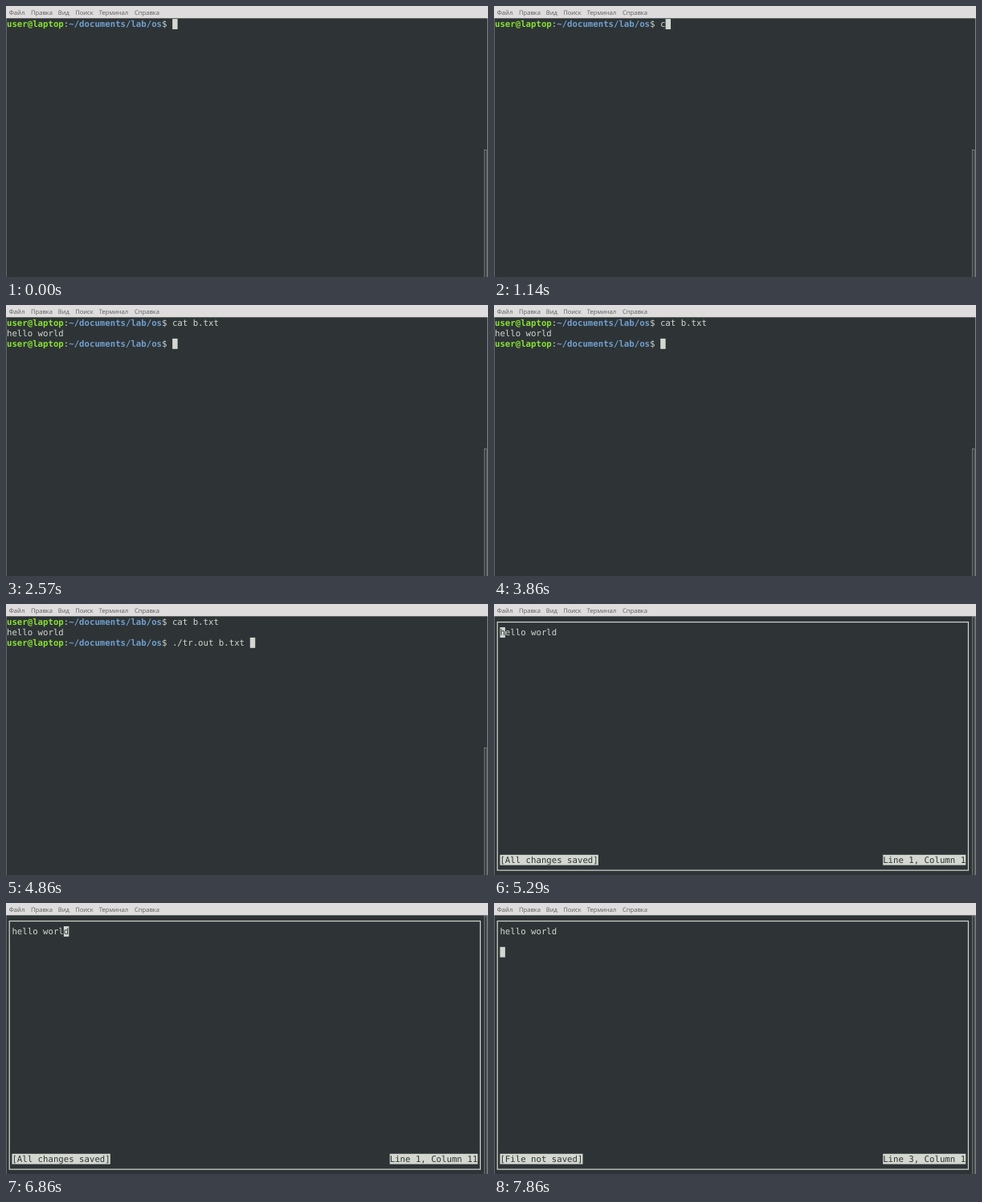
An HTML page that plays this animation: 600x338 px, repeating every 8000 ms.

```html
<!DOCTYPE html>
<html lang="ru">
<head>
<meta charset="utf-8">
<title>Terminal</title>
<style>
  html, body { margin: 0; width: 100%; height: 100%; overflow: hidden; background: #2e3436; }
  svg { display: block; width: 600px; height: 338px; }
  text { white-space: pre; text-rendering: geometricPrecision; }
  .mono { font: 10.7px "DejaVu Sans Mono", monospace; fill: #d3d7cf; }
  .menu { font: 7.6px "Open Sans", "Noto Sans", sans-serif; fill: #5c5c5c; }
  .user { font-weight: bold; fill: #8ae234; }
  .path { font-weight: bold; fill: #729fcf; }
  .light { fill: #d3d7cf; }
  .dark { fill: #2e3436; }
  .thumb { fill: #2b3032; stroke: #868a8a; stroke-width: .8; }
  .frame { fill: none; stroke: #d3d7cf; stroke-width: 1.2; }
</style>
</head>
<body>
<svg viewBox="0 0 600 338">
  <rect class="dark" width="600" height="338"/>
  <rect width=".6" height="338" fill="#85898a"/>
  <rect x="599.3" width=".7" height="338" fill="#a5a8a8"/>
  <rect width="600" height="15.3" fill="#dedcdd"/>
  <g id="menu"></g>
  <rect id="thumb" class="thumb" x="595.4" width="2.6" height="330"/>
  <g id="shell"></g>
  <g id="editor"></g>
  <g id="cursor"></g>
</svg>
<script>
const LOOP = 8000;
const CELL_W = 6.442, CELL_H = 12.9, LEFT = 1, TOP = 16.1, BASE = 9.9;
const COLS = 92, ROWS = 25, STATUS_ROW = 23;
const USER = "user@laptop", PATH = "~/documents/lab/os";
const PROMPT_LEN = USER.length + PATH.length + 3;
const LINE = "hello world";

const colX = col => LEFT + col * CELL_W;
const rowY = row => TOP + row * CELL_H;
const $ = id => document.getElementById(id);

function add(parent, tag, attrs = {}, content = "") {
  const node = document.createElementNS("http://www.w3.org/2000/svg", tag);
  for (const key in attrs) node.setAttribute(key, attrs[key]);
  node.textContent = content;
  return parent.appendChild(node);
}

function addText(parent, row, col, content = "", cls = "") {
  return add(parent, "text", { x: colX(col), y: rowY(row) + BASE, class: "mono " + cls }, content);
}

function addCell(parent, row, col) {
  return add(parent, "rect", {
    x: colX(col), y: rowY(row), width: CELL_W, height: CELL_H, class: "light"
  });
}

function addPrompt(row) {
  const line = addText($("shell"), row, 0);
  add(line, "tspan", { class: "user" }, USER);
  add(line, "tspan", {}, ":");
  add(line, "tspan", { class: "path" }, PATH);
  add(line, "tspan", {}, "$ ");
  return { line, input: add(line, "tspan") };
}

// Reversed status label, anchored to the left or right inner column
function addStatus(fromRight) {
  const back = addCell($("editor"), STATUS_ROW, 1);
  const label = addText($("editor"), STATUS_ROW, 1);
  label.style.fill = "#2e3436";
  return content => {
    const x = colX(fromRight ? COLS - 1 - content.length : 1);
    back.setAttribute("x", x);
    back.setAttribute("width", content.length * CELL_W);
    label.setAttribute("x", x);
    label.textContent = content;
  };
}

const menu = [["Файл", 3.8], ["Правка", 31], ["Вид", 64.8], ["Поиск", 86.2], ["Терминал", 115.8], ["Справка", 160]];
for (const [name, x] of menu) add($("menu"), "text", { x, y: 10.7, class: "menu" }, name);

const first = addPrompt(0);
const output = addText($("shell"), 1, 0, LINE);
const second = addPrompt(2);

add($("editor"), "rect", {
  x: colX(.5), y: rowY(.5), class: "frame",
  width: (COLS - 1) * CELL_W, height: (ROWS - 1) * CELL_H
});
addText($("editor"), 1, 1, LINE);
const setSaved = addStatus(false);
const setPosition = addStatus(true);

addCell($("cursor"), 0, 0);
const under = addText($("cursor"), 0, 0);
under.style.fill = "#2e3436";

function placeCursor(row, col, char = "") {
  $("cursor").setAttribute("transform", `translate(${col * CELL_W} ${row * CELL_H})`);
  under.textContent = char;
}

const show = (node, on) => node.style.display = on ? "" : "none";

// Last entry whose time has passed
const at = (track, t) => track.filter(([start]) => start <= t).pop()[1];

const firstInput = [[0, ""], [1140, "c"], [1290, "ca"], [1430, "cat"], [1570, "cat "],
  [1860, "cat b"], [2140, "cat b.txt "]];
const secondInput = [[0, ""], [4000, "."], [4140, "./"], [4430, "./t"], [4570, "./tr.out "],
  [4710, "./tr.out b"], [4860, "./tr.out b.txt "]];
const position = [[0, [1, 1]], [6140, [1, 2]], [6570, [1, 3]], [6710, [1, 7]], [6860, [1, 11]],
  [7000, [1, 12]], [7430, [2, 1]], [7860, [3, 1]]];
const blink = [[0, true], [570, false], [1140, true], [3140, false], [3860, true],
  [5860, false], [6140, true]];
const RUN = 2570, OPEN = 5290, EDIT = 7430;

function drawShell(t) {
  const ran = t >= RUN;
  const { input } = ran ? second : first;
  first.input.textContent = at(firstInput, t);
  second.input.textContent = at(secondInput, t);
  show(output, ran);
  show(second.line, ran);
  placeCursor(ran ? 2 : 0, PROMPT_LEN + input.textContent.length);
}

function drawEditor(t) {
  const [line, column] = at(position, t);
  setSaved(t < EDIT ? "[All changes saved]" : "[File not saved]");
  setPosition(`Line ${line}, Column ${column}`);
  placeCursor(line, column, line === 1 ? LINE.charAt(column - 1) : "");
}

function draw(t) {
  const editing = t >= OPEN;
  show($("shell"), !editing);
  show($("editor"), editing);
  show($("cursor"), at(blink, t));
  $("thumb").setAttribute("y", editing ? 16 : 179.4);
  (editing ? drawEditor : drawShell)(t);
}

const begin = performance.now();
function tick() {
  draw((performance.now() - begin) % LOOP);
  requestAnimationFrame(tick);
}
tick();
</script>
</body>
</html>
```
